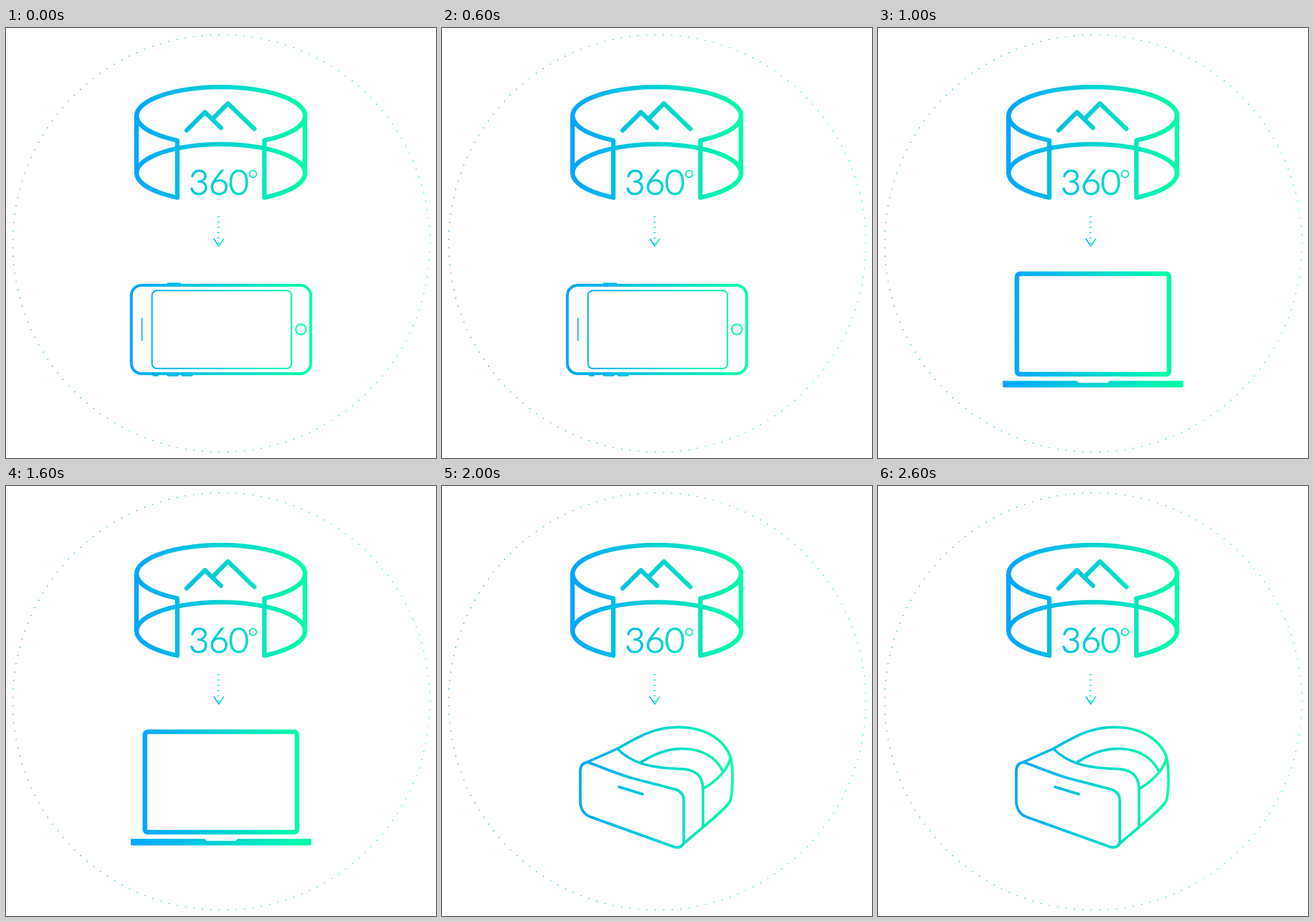
Animation of 748 by 748 pixels, one loop 3 s. Source, as an HTML page with a canvas:

```html
<!DOCTYPE html>
<html lang="en">
<head>
<meta charset="utf-8">
<title>360° viewing devices</title>
<style>
  html, body { margin: 0; width: 100%; height: 100%; overflow: hidden; background: #fff; }
  canvas { display: block; width: 748px; height: 748px; }
</style>
</head>
<body>
<canvas id="stage" width="748" height="748"></canvas>
<script>
const ctx = document.getElementById('stage').getContext('2d');
const TAU = Math.PI * 2;
const HOLD = 1000;

function paint(left, right) {
  const g = ctx.createLinearGradient(left, 0, right, 0);
  g.addColorStop(0, '#00a5ff');
  g.addColorStop(1, '#00ffa5');
  ctx.strokeStyle = ctx.fillStyle = g;
}

function stroke(d, width) {
  ctx.lineWidth = width;
  ctx.stroke(new Path2D(d));
}

function roundRect(x, y, right, bottom, radius, width) {
  ctx.beginPath();
  ctx.roundRect(x, y, right - x, bottom - y, radius);
  if (width) {
    ctx.lineWidth = width;
    ctx.stroke();
  } else {
    ctx.fill();
  }
}

function ring(x, y, r, width) {
  ctx.beginPath();
  ctx.arc(x, y, r, 0, TAU);
  ctx.lineWidth = width;
  ctx.stroke();
}

// Light type thickened by a thin outline
function digit(char, x) {
  ctx.fillText(char, x, 290);
  ctx.lineWidth = 1.5;
  ctx.strokeText(char, x, 290);
}

function drawDottedCircle() {
  const count = 155;
  paint(11, 737);
  for (let i = 0; i < count; i++) {
    const a = TAU * i / count - Math.PI / 2 - 0.011;
    ctx.beginPath();
    ctx.arc(374.5 + 363 * Math.cos(a), 374.7 + 363 * Math.sin(a), 0.95, 0, TAU);
    ctx.fill();
  }
}

function drawPanorama() {
  paint(223, 524);
  stroke('M298 195.5A146.5 50 0 1 1 449.5 195.5V295A146.5 50 0 1 0 298 295Z', 7.8);
  stroke('M227 153V252M520 153V252', 7.8);
  stroke('M314.3 178L346 146.5L374 173.5M360 157.5L386 131.3L432 175.5', 7.8);

  ctx.font = '300 61px Lato, sans-serif';
  ctx.textAlign = 'center';
  digit('3', 335.8);
  digit('6', 370.5);
  digit('0', 405);
  ring(429.8, 254, 6, 2.2);
}

function drawArrow() {
  paint(355, 385);
  for (let i = 0; i < 6; i++) ctx.fillRect(368, 327.5 + i * 9.2, 3.5, 1.6);
  paint(361, 379);
  stroke('M362 367L370 379.5L378.5 367', 2);
}

function drawPhone() {
  paint(215, 533);
  roundRect(218, 447.5, 530, 601.3, 18, 5);
  roundRect(254, 456.8, 496.5, 592.3, 8, 2.5);
  ctx.fillRect(235.5, 504.5, 2, 39.5);
  ring(513, 524.3, 9, 2.5);
  roundRect(280, 443, 304.5, 447, [2, 2, 0, 0]);
  for (const [x, right] of [[255, 265], [280, 300], [305, 325]]) {
    roundRect(x, 602, right, 606, [0, 0, 2, 2]);
  }
}

function drawLaptop() {
  paint(237, 511);
  roundRect(241.6, 427.6, 506.3, 602.3, 5, 8);
  paint(217, 531);
  ctx.fill(new Path2D('M217 613.8H345.5L349 617.3H399.5L403 613.8H531V622Q531 625.3 528 625.3H220Q217 625.3 217 622Z'));
}

function drawHeadset() {
  paint(238, 508);
  // Visor front
  stroke('M240.5 551V495Q241 482 253 480.5C263 483 299 499 330 508L403 527Q420.5 531 420.5 547V622C417 628 411 630 403 627.5L258 575.5Q243 570 240.5 551Z', 4.6);
  // Outer shell and strap
  stroke('M250 481.5L305 457C345 434 370 420 410 419.5C455 419.5 488 438 501.5 470C507 490 506 530 502 546C499 556 470 580 454 593.5L418 624', 4.6);
  stroke('M305 457C330 482 360 490 412 492C440 492 454 503 454 527V593', 4.5);
  stroke('M347 480C375 463 395 457 418 457C450 457 476 470 489 497M454 527C480 512 500 490 502 470', 4.5);
  stroke('M308 523.5L349 536', 4.5);
}

const devices = [drawPhone, drawLaptop, drawHeadset];
const start = performance.now();

function render() {
  const elapsed = performance.now() - start;
  ctx.fillStyle = '#fff';
  ctx.fillRect(0, 0, 748, 748);
  ctx.lineCap = ctx.lineJoin = 'round';
  drawDottedCircle();
  drawPanorama();
  drawArrow();
  devices[Math.floor(elapsed / HOLD) % devices.length]();
  requestAnimationFrame(render);
}
render();
</script>
</body>
</html>
```
